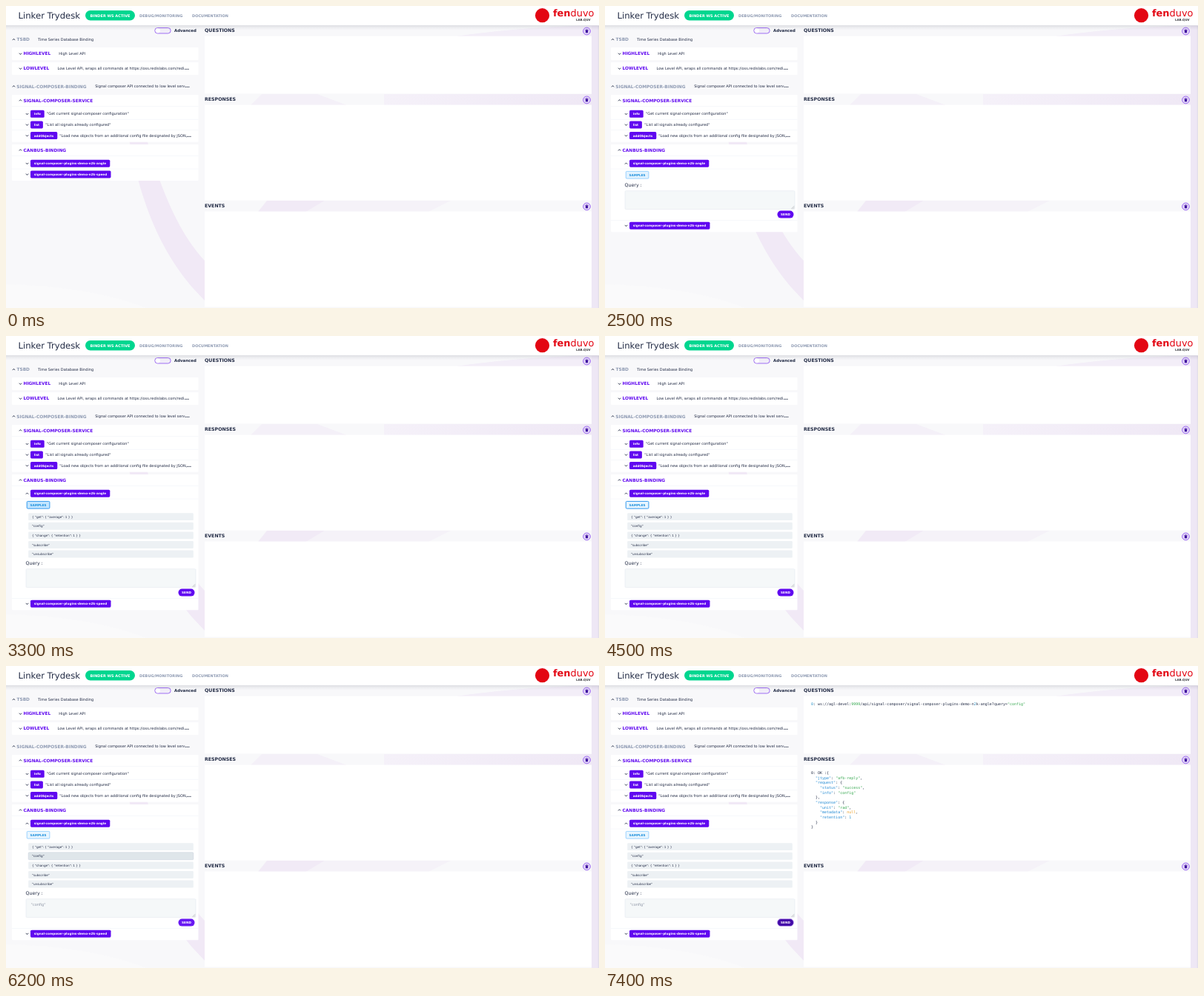
An HTML page for the animation above (8000 ms loop, 800 px wide and 408 px high).

```html
<!DOCTYPE html>
<html lang="en">
<head>
<meta charset="utf-8">
<title>API console</title>
<style>
html, body { margin: 0; width: 100%; height: 100%; overflow: hidden; background: #f8f8f9; }
svg { display: block; width: 100vw; height: 100vh; }
text { font-family: "DejaVu Sans", sans-serif; white-space: pre; text-rendering: geometricPrecision; }
.b { font-weight: 700; }
.m { font-family: "DejaVu Sans Mono", monospace; }
</style>
</head>
<body>
<svg id="stage" viewBox="0 0 800 408" preserveAspectRatio="none" xmlns="http://www.w3.org/2000/svg"></svg>
<script>
const PX = 800 / 1920; // layout was designed at 1920 wide
const LOOP = 8000;
const INK = '#222b45', GREY = '#8f9bb3', VIOLET = '#6008f0', LINE = '#edf1f7';
const svg = document.getElementById('stage');

const rect = (x, y, w, h, fill, extra = '') =>
  `<rect x="${x}" y="${y}" width="${w}" height="${h}" fill="${fill}" ${extra}/>`;

// text centred on cap height at y, size given in design pixels
const text = (x, y, size, str, fill = INK, cls = '', extra = '') => {
  const s = size * PX;
  return `<text x="${x}" y="${(y + s * 0.365).toFixed(2)}" font-size="${s.toFixed(3)}" fill="${fill}" class="${cls}" ${extra}>${str}</text>`;
};
const bold = (x, y, size, str, fill, extra) => text(x, y, size, str, fill, 'b', extra);
const dots = (x, y) => bold(x, y - 0.5, 15, '…');

const chevronPath = (x, y, up) => {
  const d = up ? -0.9 : 0.9;
  return `M${x - 1.6} ${y - d}L${x} ${y + d}L${x + 1.6} ${y - d}`;
};
const chevron = (x, y, up, id = '') =>
  `<path ${id && `id="${id}"`} d="${chevronPath(x, y, up)}" fill="none" stroke="${INK}" stroke-width=".9"/>`;

const tag = (y, w, name) =>
  rect(33, y - 4.8, w, 10, VIOLET, 'rx="1.6"') + bold(37.8, y + 0.1, 10, name, '#fff');

const verb = (y, w, name, x, info) =>
  chevron(28.5, y + 0.3, false) + tag(y, w, name) + text(x, y, 12, info);

const bin = y => `<circle cx="783.5" cy="${y}" r="4.9" fill="#e3d6f8" stroke="#8a4cf0" stroke-width=".8"/>
  <path d="M781.4 ${y - 1.5}h4.2M782.8 ${y - 2.1}h1.4" stroke="#3b0a9c" stroke-width=".7"/>
  ${rect(781.9, y - 1, 3.2, 3.3, '#3b0a9c', 'rx=".5"')}`;

const pane = (title, y, h) =>
  bold(268, y, 15, title) + bin(y + 1) + rect(268, y + 7.7, 522, h, '#fff');

const span = (str, fill) => `<tspan fill="${fill}">${str}</tspan>`;
const CODE = { key: '#1e88d2', str: '#35a84f', num: '#2a93c9', nil: '#eda22d' };

// colours keys, strings, numbers and null
const paint = line => line.replace(/("[^"]*")(:?)|\b(null|\d+)\b/g, (all, str, colon, word) => {
  if (str) return span(str, colon ? CODE.key : CODE.str) + colon;
  return span(word, word === 'null' ? CODE.nil : CODE.num);
});
const mono = (y, str) => text(278, y, 12, str, INK, 'm');

const REPLY = [
  '{', '  "jtype": "afb-reply",', '  "request": {', '    "status": "success",',
  '    "info": "config"', '  },', '  "response": {', '    "unit": "rad",',
  '    "metadata": null,', '    "retention": 1', '  }', '}'
];
const SAMPLES = [
  '{ "get": { "average": 1 } }', '"config"', '{ "change": { "retention": 1 } }',
  '"subscribe"', '"unsubscribe"'
];

const backdrop = `
  <defs>
    <linearGradient id="sweep" x1="0" y1="0" x2="1" y2="0">
      <stop offset="0" stop-color="#f5f1f9"/><stop offset="1" stop-color="#efe8f5"/>
    </linearGradient>
    <linearGradient id="shade" x1="0" y1="0" x2="0" y2="1">
      <stop offset="0" stop-color="#2c3349" stop-opacity=".13"/>
      <stop offset=".5" stop-color="#2c3349" stop-opacity=".05"/>
      <stop offset="1" stop-color="#2c3349" stop-opacity="0"/>
    </linearGradient>
    <clipPath id="fold"><rect id="foldBox" x="8" y="219" width="252" height="0"/></clipPath>
  </defs>
  ${rect(0, 0, 800, 408, '#f8f8fa')}
  <path d="M0 376Q110 378 190 408H0Z" fill="#fafafb"/>
  <path d="M166 180C186 290 222 352 268 398V344C238 312 212 260 190 180Z" fill="#f1e9f6"/>
  <path d="M330 134L345 119H420L460 134Z" fill="#f4f0f8"/>
  <path d="M340 278L352 263H430L405 278Z" fill="#f1eaf6"/>
  <path d="M430 263H600L570 278H405Z" fill="#f5f2f8"/>
  ${rect(510, 119, 280, 15, 'url(#sweep)')}
  <path d="M600 42Q690 28 800 26V42Z" fill="#f3eef8"/>
  ${rect(790, 27, 10, 381, '#eee7f5')}${rect(798.6, 27, 1.4, 381, '#e3dfea')}`;

const header = `
  ${rect(0, 26, 800, 6.7, 'url(#shade)')}${rect(0, 0, 800, 26, '#fff')}
  ${text(16.5, 12.7, 28, 'Linker Trydesk')}
  ${rect(107, 6, 67, 13.4, '#00d68f', 'rx="6.7"')}
  ${bold(113.5, 12.8, 12, 'BINDER WS ACTIVE', '#fff')}
  ${bold(180, 12.8, 12, 'DEBUG/MONITORING', GREY)}
  ${bold(251, 12.8, 12, 'DOCUMENTATION', GREY)}
  <circle cx="723.5" cy="12.7" r="9.6" fill="#e30613"/>
  ${bold(738, 9.5, 31, 'fen<tspan font-weight="400">duvo</tspan>', '#e30613')}
  ${bold(769, 19, 9.5, 'LAB.QUV', '#3a3a3f')}`;

const leftTop = `
  ${rect(200.8, 29.5, 21.4, 7.5, '#f1edf8', 'rx="3.7" stroke="#7a35f0" stroke-width=".7"')}
  <circle cx="204.8" cy="33.2" r="3.1" fill="#fff"/>
  ${bold(227, 33.2, 13, 'Advanced')}
  ${chevron(10.5, 45.2, true)}${bold(14.5, 45.2, 14, 'TSBD', GREY)}
  ${text(43, 45.2, 12, 'Time Series Database Binding')}
  ${rect(8, 56, 251.5, 17, '#fff', 'rx="1"')}${rect(8, 76, 251.5, 17, '#fff', 'rx="1"')}
  ${chevron(19.5, 64.6, false)}${bold(23.5, 64.2, 14, 'HIGHLEVEL', VIOLET)}
  ${text(71.3, 64.3, 12, 'High Level API')}
  ${chevron(19.5, 84.6, false)}${bold(23.5, 84.2, 14, 'LOWLEVEL', VIOLET)}
  ${text(69.5, 84.3, 12, 'Low Level API, wraps all commands at https://oss.redislabs.com/redi')}
  ${dots(240.8, 84.3)}
  ${chevron(10.5, 108.5, true)}${bold(14.3, 108.6, 14, 'SIGNAL-COMPOSER-BINDING', GREY)}
  ${text(120.2, 108.6, 12, 'Signal composer API connected to low level serv')}
  ${dots(241.6, 108.6)}
  ${rect(8, 120, 251.5, 63.8, '#fff', 'rx="1"')}
  ${chevron(19.5, 127.4, true)}${bold(23.5, 127.4, 14, 'SIGNAL-COMPOSER-SERVICE', VIOLET)}
  ${[135.3, 152.9, 167.5].map(y => rect(8, y, 251.5, 0.5, LINE)).join('')}
  ${verb(145.6, 18.7, 'info', 55, '"Get current signal-composer configuration"')}
  ${verb(160.2, 16.9, 'list', 53.3, '"List all signals already configured"')}
  ${verb(174.9, 36.3, 'addObjects', 72.2, '"Load new objects from an additional config file designated by JSON,')}
  ${dots(243.8, 174.9)}`;

const sampleRow = (str, i) => {
  const y = 244.2 + i * 12.6;
  return rect(30.2, (y - 5).toFixed(2), 222.6, 9.9, '#edf1f4', `rx="1.2" id="row${i}" stroke-width=".6"`)
    + text(35, y, 10, str);
};

const canbus = `
  ${rect(8, 187, 251.5, 49, '#fff', 'rx="1" id="card"')}
  ${chevron(19.5, 194.6, true)}${bold(23.5, 194.6, 14, 'CANBUS-BINDING', VIOLET)}
  ${rect(8, 202.2, 251.5, 0.5, LINE)}
  ${chevron(28.5, 212.8, false, 'arrow')}${tag(212.5, 107.3, 'signal-composer-plugins-demo-n2k-angle')}
  <g clip-path="url(#fold)" id="detail">
    ${rect(8, 219.8, 251.5, 0.5, LINE)}
    ${rect(28.2, 223.4, 30.7, 9.7, '#e9f6ff', 'rx="1.2" id="samples"')}
    ${bold(32.6, 228.3, 10, 'SAMPLES', '#1c8fdd')}
    <g id="list">${SAMPLES.map(sampleRow).join('')}</g>
    <g id="form">
      ${text(26.6, 242, 15, 'Query :')}
      ${rect(27, 249.7, 229, 25, '#f5f8f9', 'rx="1.2" stroke="#dfe5ec" stroke-width=".5"')}
      <path d="M251.5 274L255.3 270.2M253.5 274L255.3 272.2" stroke="#8c8c92" stroke-width=".5"/>
      ${text(33.6, 256.8, 12, '"config"', '#8f96a6', '', 'id="typed"')}
      ${rect(232.5, 276.6, 22, 10, VIOLET, 'rx="5" id="send"')}
      ${bold(237.1, 281.6, 10, 'SEND', '#fff')}
    </g>
  </g>
  <g id="speed">
    ${rect(8, 219.8, 251.5, 0.5, LINE)}
    ${chevron(28.5, 227.5, false)}${tag(227.2, 108.5, 'signal-composer-plugins-demo-n2k-speed')}
  </g>`;

const question = span('0', CODE.num) + ': ws://agl-devel:' + span('9999', CODE.str)
  + '/api/signal-composer/signal-composer-plugins-demo-n' + span('2', CODE.num)
  + 'k-angle?query=' + span('"config"', CODE.str);

const right = pane('QUESTIONS', 33, 77.8) + pane('RESPONSES', 125.9, 129)
  + pane('EVENTS', 269.9, 129)
  + `<g id="asked">${mono(51.5, question)}</g><g id="reply">`
  + REPLY.map((s, i) => mono(144 + i * 6.68, (i ? '' : '0: OK :') + paint(s))).join('') + '</g>';

svg.innerHTML = backdrop + leftTop + canbus + right + header;

const el = {};
svg.querySelectorAll('[id]').forEach(n => { el[n.id] = n; });
const set = (node, attrs) => { for (const k in attrs) node.setAttribute(k, attrs[k]); };
const show = (node, on) => { node.style.display = on ? '' : 'none'; };

const mix = (a, b, k) => {
  const part = (c, i) => parseInt(c.slice(i, i + 2), 16);
  return 'rgb(' + [1, 3, 5].map(i => Math.round(part(a, i) + (part(b, i) - part(a, i)) * k)) + ')';
};

function draw(time) {
  const t = Math.floor(time / 100) * 100;
  // share of the change done, first and last step included
  const ramp = (from, to) => Math.max(0, Math.min(1, (t - from + 100) / (to - from + 100)));
  const during = (from, to) => t >= from && t < to;

  const open = t >= 1500, listed = t >= 3200;
  const drop = !open ? 0 : t < 1600 ? 62.7 : listed ? 134.3 : 69.3;
  set(el.card, { height: 49 + drop });
  set(el.speed, { transform: `translate(0 ${drop})` });
  set(el.foldBox, { height: drop + 1.3 });
  set(el.arrow, { d: chevronPath(28.5, 212.8, open) });
  show(el.detail, open);
  show(el.list, listed);
  set(el.form, { transform: `translate(0 ${listed ? 65 : 0})` });

  const focus = during(3100, 5100) ? ramp(3100, 3300) : 0;
  const hover = ramp(2500, 2700) * (1 - ramp(4000, 4200));
  set(el.samples, {
    fill: mix('#e9f6ff', '#c4e6ff', hover * (1 + focus) / 2),
    stroke: mix('#42aaff', '#2f97ee', focus),
    'stroke-width': 0.5 + focus * 0.5
  });

  // the second sample is picked, then keeps its focus until SEND is pressed
  const picked = during(5100, 6500);
  const settle = ramp(5400, 5500);
  set(el.row1, {
    fill: picked ? mix('#e8edf0', '#dfe6ea', settle) : '#edf1f4',
    stroke: picked ? mix('#e0e6ea', '#cbd4dd', settle) : 'none'
  });
  show(el.typed, t >= 5100);

  const over = ramp(5900, 6300), press = ramp(6500, 6800), held = ramp(7300, 7400);
  const warm = mix('#6008f0', '#6a1cf2', over);
  set(el.send, {
    fill: held ? mix('#5a1cdc', '#430aa8', held) : press ? mix('#6a1cf2', '#5a1cdc', press) : warm,
    stroke: held ? '#c9b2f4' : 'none',
    'stroke-width': held * 0.8
  });

  show(el.asked, t >= 6900);
  show(el.reply, t >= 6900);
}

const start = performance.now();
function tick() {
  draw((performance.now() - start) % LOOP);
  requestAnimationFrame(tick);
}
draw(0);
requestAnimationFrame(tick);
</script>
</body>
</html>
```
